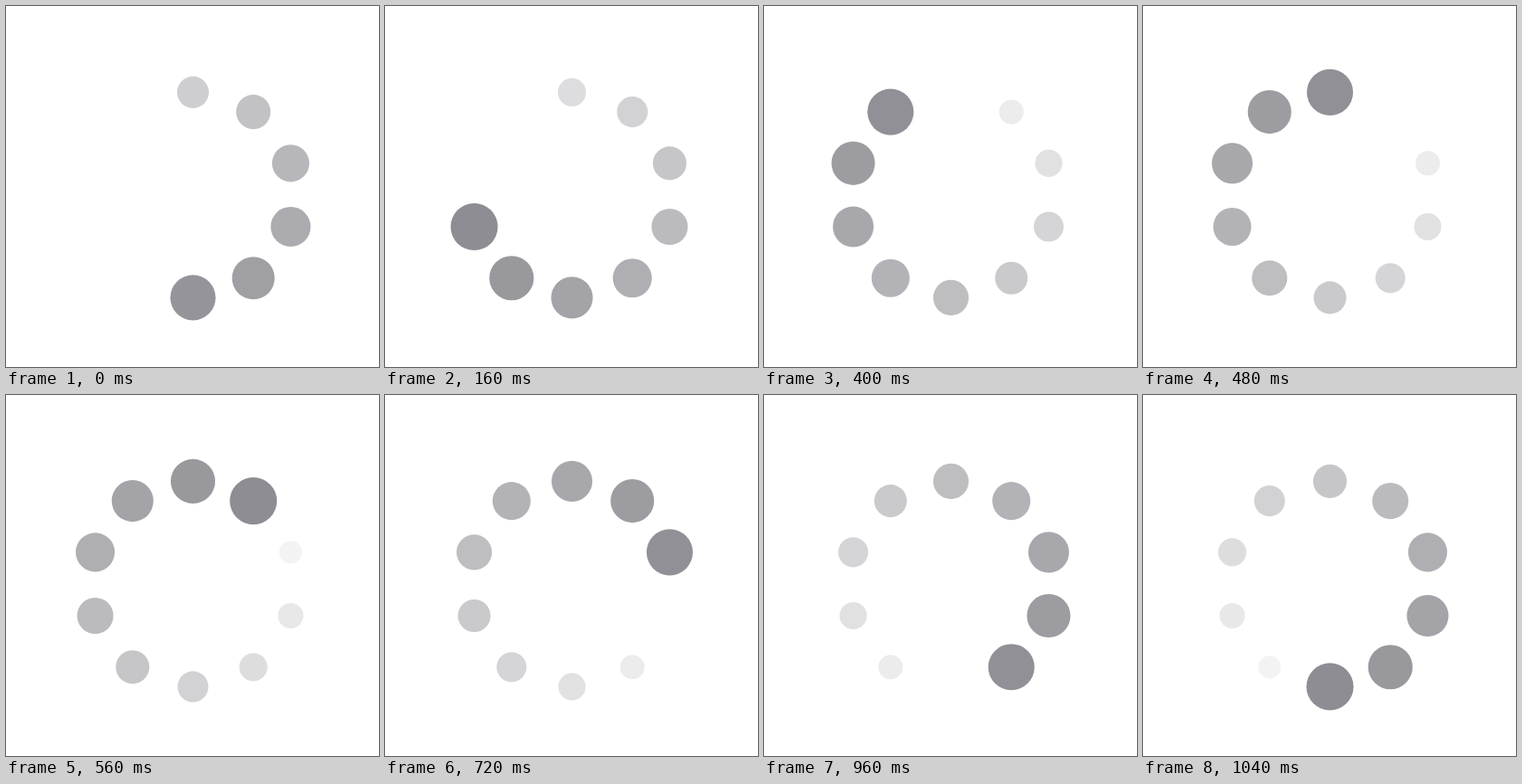
Write an HTML page that moves like this. It is 412 px wide and 399 px high and loops after 1120 ms.

```html
<!DOCTYPE html>
<html lang="en">
<head>
<meta charset="utf-8">
<title>Loading ring</title>
<style>
  html, body { margin: 0; width: 100%; height: 100%; overflow: hidden; background: #fff; }
  svg { display: block; width: 412px; height: 399px; }
</style>
</head>
<body>
<svg viewBox="0 0 412 399" fill="#8e8d93"></svg>
<script>
  const COUNT = 10;
  const STEP_MS = 80;
  const CENTER = { x: 206.5, y: 208.9 };
  const RING = 113.5;

  // Position of the leading dot at each step, in thirds of a dot spacing
  const HEAD = [17, 19, 21, 24, 26, 28, 31, 33, 35, 37, 39, 41, 43, 45];

  const svg = document.querySelector("svg");
  const dots = Array.from({ length: COUNT }, (_, i) => {
    const angle = i * 2 * Math.PI / COUNT;
    const dot = document.createElementNS(svg.namespaceURI, "circle");
    dot.setAttribute("cx", CENTER.x + RING * Math.sin(angle));
    dot.setAttribute("cy", CENTER.y - RING * Math.cos(angle));
    return svg.appendChild(dot);
  });

  function draw(time) {
    const head = HEAD[Math.floor(time / STEP_MS) % HEAD.length] / 3;
    dots.forEach((dot, i) => {
      // Dots ahead of the leader on its first lap have not appeared yet
      const age = (head - i) % COUNT;
      const visible = head >= i && age < 9.2;
      dot.setAttribute("r", visible ? 26.05 - 1.5 * age : 0);
      dot.setAttribute("fill-opacity", visible ? 1 - age / COUNT : 0);
    });
  }

  const start = performance.now();
  function tick() {
    draw(performance.now() - start);
    requestAnimationFrame(tick);
  }
  tick();
</script>
</body>
</html>
```
